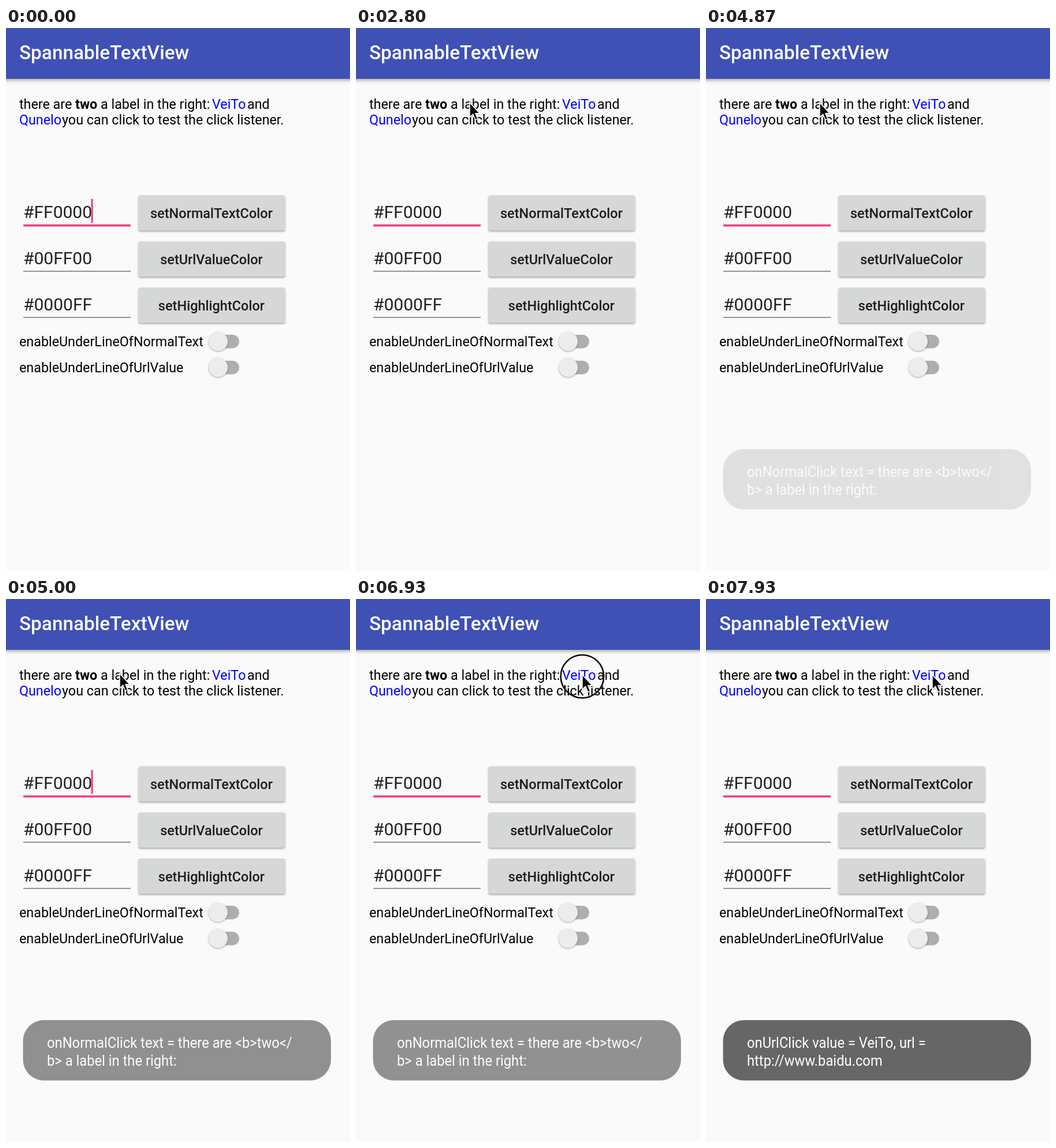
Recreate the animation shown at these times as an HTML page. Size 596 by 940 pixels, loop 8000 ms.

```html
<!DOCTYPE html>
<html lang="en">
<head>
<meta charset="utf-8">
<title>SpannableTextView</title>
<style>
  html, body { margin: 0; width: 100%; height: 100%; overflow: hidden; background: #fafafa; }
  svg { display: block; width: 596px; height: 940px; font: 23.3px Roboto, sans-serif; }
  text { white-space: pre; }
  .bar { fill: #3f51b5; filter: drop-shadow(0 2px 3px rgba(0, 0, 0, .38)); }
  .title { font-size: 33.3px; font-weight: 500; fill: #fff; }
  .bold { font-weight: 700; }
  .link { fill: #00f; }
  .field { font-size: 30px; fill: #212121; }
  .line { fill: #7d7d7d; }
  .accent { fill: #f0417c; }
  .button { fill: #d6d7d7; filter: drop-shadow(0 2px 1.5px rgba(0, 0, 0, .32)); }
  .caption { font-size: 23.5px; font-weight: 500; fill: #1d1d1d; text-anchor: middle; }
  .track { fill: #aeaeae; }
  .thumb { fill: #ececec; filter: drop-shadow(0 1.5px 1.5px rgba(0, 0, 0, .35)); }
  .toast rect { fill: #666; }
  .toast text { font-size: 26.7px; fill: #fff; }
  #ring { fill: none; stroke: #0a0a0a; stroke-width: 2.6; }
  #pointer path { stroke: #fff; stroke-width: 1.6; filter: drop-shadow(0 1.5px 1px rgba(0, 0, 0, .3)); }
</style>
</head>
<body>
<svg viewBox="0 0 596 940">
  <rect width="596" height="940" fill="#fafafa"/>
  <rect class="bar" x="-10" y="-10" width="616" height="98"/>
  <text class="title" x="23" y="54">SpannableTextView</text>

  <text x="23" y="139.5">there are <tspan class="bold">two</tspan> a label in the right: </text>
  <text class="link" x="357" y="139.5">VeiTo</text>
  <text x="418" y="139.5">and</text>
  <text class="link" x="23" y="166.8">Qunelo</text>
  <text x="97" y="166.8">you can click to test the click listener.</text>

  <g id="rows"></g>
  <rect id="caret" class="accent" x="147.5" y="296" width="3.2" height="41"/>
  <g id="switches"></g>
  <g id="toasts"></g>

  <circle id="ring" r="37.3"/>
  <g id="pointer"><path d="M0 0V25.5L5.6 20.4 9.8 30 14 28.2 9.9 18.9H17.6Z"/></g>
</svg>
<script>
const LOOP = 8000;
const byId = id => document.getElementById(id);
const clamp = (v, lo = 0, hi = 1) => Math.min(hi, Math.max(lo, v));
const progress = (t, start, length) => clamp((t - start) / length);
const smooth = p => p * p * (3 - 2 * p);

const rows = [
  ['#FF0000', 'setNormalTextColor'],
  ['#00FF00', 'setUrlValueColor'],
  ['#0000FF', 'setHighlightColor'],
];
byId('rows').innerHTML = rows.map(([value, caption], i) => `
  <g transform="translate(0 ${i * 79.9})">
    <text class="field" x="30" y="329">${value}</text>
    ${i ? '<rect class="line" x="30" y="340.4" width="186" height="1.6"/>'
        : '<rect class="accent" x="30" y="340" width="186" height="3.6"/>'}
    <rect class="button" x="229.5" y="289.5" width="254" height="61" rx="3.3"/>
    <text class="caption" x="356" y="329">${caption}</text>
  </g>`).join('');

byId('switches').innerHTML = ['NormalText', 'UrlValue'].map((name, i) => `
  <g transform="translate(0 ${i * 45})">
    <text x="23" y="551">enableUnderLineOf${name}</text>
    <rect class="track" x="354" y="531" width="50" height="23.4" rx="11.7"/>
    <circle class="thumb" cx="367.6" cy="542.5" r="16.6"/>
  </g>`).join('');

const toasts = [
  { lines: ['onNormalClick text = there are &lt;b&gt;two&lt;/', 'b&gt; a label in the right:'], show: 4840, hide: 6800 },
  { lines: ['onUrlClick value = VeiTo, url =', 'http://www.baidu.com'], show: 7250, hide: Infinity },
];
// The toast face is a condensed cut, narrowed uniformly from the regular one.
byId('toasts').innerHTML = toasts.map(({ lines }) => `
  <g class="toast">
    <rect x="29.5" y="729" width="533.5" height="104.5" rx="36"/>
    ${lines.map((line, i) => `
      <text transform="translate(71 ${776.5 + i * 31.4}) scale(.89 1)">${line}</text>`).join('')}
  </g>`).join('');
const toastNodes = [...byId('toasts').children];

// Pointer stops: time, x, y
const stops = [
  [550, -20, 215], [900, 62, 178], [1350, 197, 129], [5670, 197, 129],
  [5800, 198, 137], [5950, 200, 140], [6550, 392, 131], [LOOP, 392, 131],
];
const presses = [[4640, 4860], [6840, 7060]];

function pointerAt(t) {
  const next = stops.findIndex(([time]) => time > t);
  if (next < 1) return stops[0].slice(1);
  const [t0, x0, y0] = stops[next - 1];
  const [t1, x1, y1] = stops[next];
  const p = smooth(progress(t, t0, t1 - t0));
  return [x0 + (x1 - x0) * p, y0 + (y1 - y0) * p];
}

function toastOpacity(t, { show, hide }) {
  const rise = 1 - (1 - progress(t, show, 350)) ** 2;
  const fall = 1 - progress(t, hide, 240) ** 2;
  return t < hide ? rise : fall;
}

const setVisible = (node, on) => node.setAttribute('visibility', on ? 'visible' : 'hidden');

function draw(now) {
  const t = now % LOOP;
  const [x, y] = pointerAt(t);
  byId('pointer').setAttribute('transform', `translate(${x} ${y})`);
  byId('ring').setAttribute('transform', `translate(${x} ${y + 3})`);
  setVisible(byId('pointer'), t >= stops[0][0]);
  setVisible(byId('ring'), presses.some(([down, up]) => t >= down && t < up));
  setVisible(byId('caret'), t % 1000 < 470);
  toasts.forEach((toast, i) => toastNodes[i].setAttribute('opacity', toastOpacity(t, toast)));
}

const start = performance.now();
function tick() {
  draw(performance.now() - start);
  requestAnimationFrame(tick);
}
tick();
</script>
</body>
</html>
```
